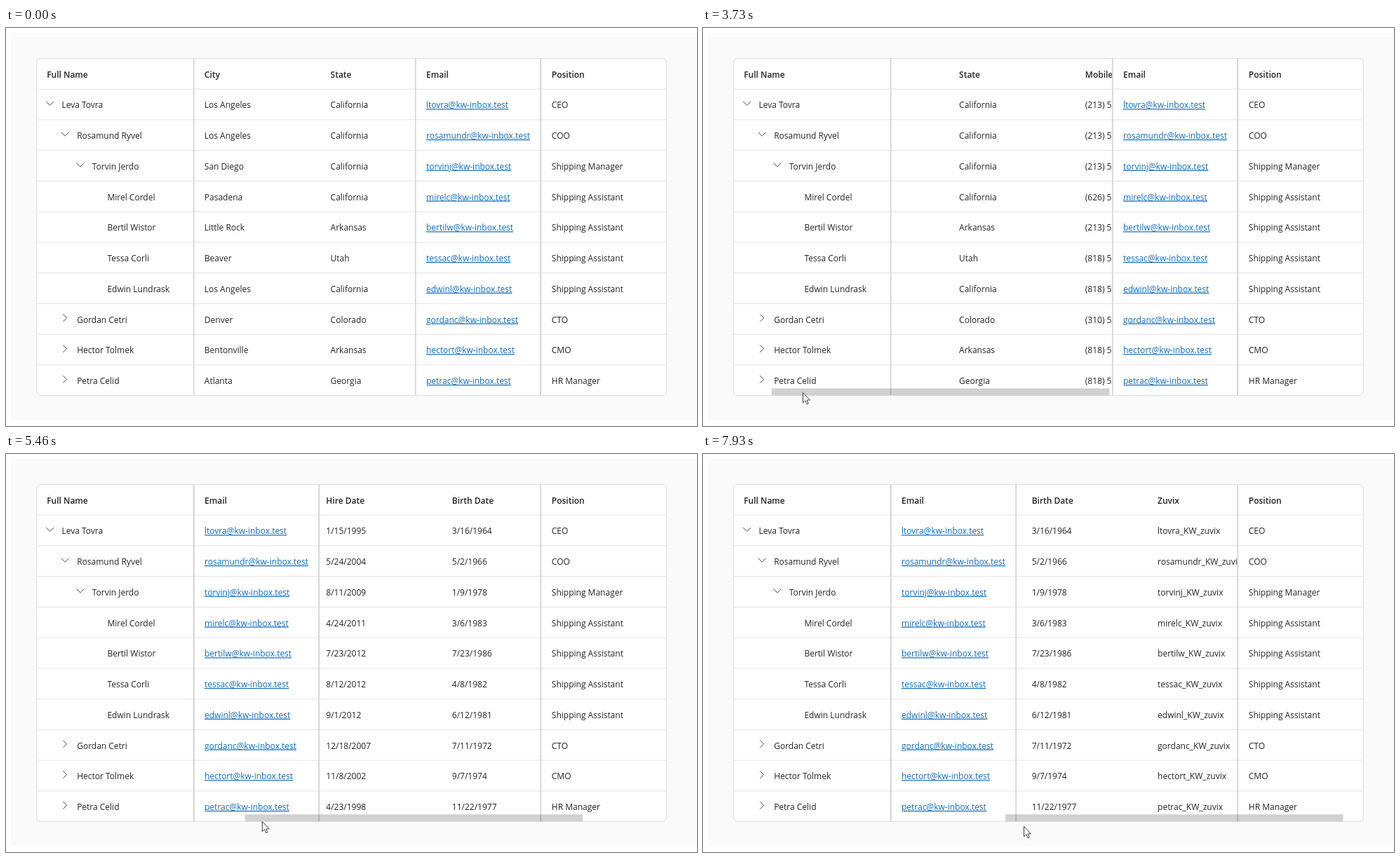
Recreate the animation shown at these times as an HTML page. Size 985 px wide and 568 px high, loop 7.99 s.

```html
<!DOCTYPE html>
<html lang="en">
<head>
<meta charset="utf-8">
<title>Employee tree list</title>
<style>
  html, body { margin: 0; width: 100%; height: 100%; overflow: hidden; background: #fff; }
  svg { display: block; width: 100%; height: 100%; }
  text { font: 12px "Open Sans", sans-serif; fill: #242424; white-space: pre; }
  .head { font-weight: 600; }
  .link { fill: #0f6cbd; text-decoration: underline; text-decoration-thickness: 1px; text-underline-offset: 1.5px; }
  .chevron { fill: none; stroke: #4a4643; stroke-width: 1; }
  .row { stroke: #e4e4e4; }
  .edge { stroke: #d6d6d6; stroke-width: 1.8; }
</style>
</head>
<body>
<svg viewBox="0 0 985 568" xmlns="http://www.w3.org/2000/svg">
  <clipPath id="view"><rect x="267.5" y="44" width="494" height="480"/></clipPath>
  <rect x="7" y="7" width="978" height="553.5" fill="#fafafa"/>
  <rect x="43.5" y="43.5" width="898" height="481" rx="5.5" fill="#fff" stroke="#e0e0e0"/>
  <g clip-path="url(#view)"><g id="cells"></g></g>
  <rect id="mask" y="44.2" width="178.3" height="479.6" fill="#fff"/>
  <g id="fixed"></g>
  <g id="email"></g>
  <rect id="thumb" y="514.3" width="481.5" height="9.9" fill="#000" fill-opacity=".18"/>
  <path id="cursor" d="M.5 .5V14.9L3.8 11.8 6.1 16.9 8.2 16 6 11H10.4Z" fill="#fff" stroke="#333" stroke-width=".95" stroke-linejoin="round"/>
</svg>
<script>
const LOOP = 7990, STEP = LOOP / 120;
const ROW = 43.75, BASE = 70.5, INDENT = 21.65;
const THUMB_MIN = 45.3, SCROLL_RATIO = 1.85;
const LEFT = 283, RIGHT = 599, EMAIL_X = 823.8;
const $ = id => document.getElementById(id);

const names = ["Leva Tovra", "Rosamund Ryvel", "Torvin Jerdo", "Mirel Cordel", "Bertil Wistor",
  "Tessa Corli", "Edwin Lundrask", "Gordan Cetri", "Hector Tolmek", "Petra Celid"];
const levels = [0, 1, 2, 3, 3, 3, 3, 1, 1, 1];
const logins = names.map((name, i) => {
  const [first, last] = name.toLowerCase().split(" ");
  return i ? first + last[0] : first[0] + last;
});

const split = s => s.split("|");
const columns = [
  [282.8, "City", split("Los Angeles|Los Angeles|San Diego|Pasadena|Little Rock|Beaver|Los Angeles|Denver|Bentonville|Atlanta")],
  [462.6, "State", split("California|California|California|California|Arkansas|Utah|California|Colorado|Arkansas|Georgia")],
  [642.3, "Mobile Phone", split("213-92|213-58|213-40|626-81|213-78|818-57|818-42|310-83|818-87|818-46")
    .map(s => `(${s.slice(0, 3)}) 555-01${s.slice(4)}`)],
  [1002.7, "Hire Date", split("1/15/1995|5/24/2004|8/11/2009|4/24/2011|7/23/2012|8/12/2012|9/1/2012|12/18/2007|11/8/2002|4/23/1998")],
  [1182.2, "Birth Date", split("3/16/1964|5/2/1966|1/9/1978|3/6/1983|7/23/1986|4/8/1982|6/12/1981|7/11/1972|9/7/1974|11/22/1977")],
  [1361.6, "Zuvix", logins.map(s => s + "_KW_zuvix")]
];
const positions = split("CEO|COO|Shipping Manager|Shipping Assistant|Shipping Assistant|Shipping Assistant|Shipping Assistant|CTO|CMO|HR Manager");

function add(parent, tag, attrs, text) {
  const el = document.createElementNS("http://www.w3.org/2000/svg", tag);
  for (const key in attrs) el.setAttribute(key, attrs[key]);
  if (text) el.textContent = text;
  return parent.appendChild(el);
}

function label(parent, x, row, text, cls = "") {
  add(parent, "text", { x, y: BASE + row * ROW, class: cls }, text);
}

function column(parent, x, title, values, cls) {
  label(parent, x, 0, title, "head");
  values.forEach((v, i) => label(parent, x, i + 1, v, cls));
}

const edge = (parent, x) => add(parent, "path", { d: `M${x} 44V524`, class: "edge" });

function build() {
  const fixed = $("fixed"), email = $("email");
  for (const [x, title, values] of columns) column($("cells"), x, title, values);

  for (let i = 1; i < 11; i++) {
    add(fixed, "path", { d: `M44 ${43.4 + i * ROW}H941`, class: "row" });
  }
  edge(fixed, 267.6);
  edge(fixed, 762.2);

  label(fixed, 58.2, 0, "Full Name", "head");
  names.forEach((name, i) => {
    const shift = levels[i] * INDENT, y = 107.6 + i * ROW;
    label(fixed, 79.5 + shift, i + 1, name);
    if (levels[i] === 3) return;
    const d = i < 3 ? "M-5.4 -2.6L0 2.8 5.4 -2.6" : "M-2.9 -5.2L2.4 0 -2.9 5.2";
    add(fixed, "path", { d, class: "chevron", transform: `translate(${62.6 + shift} ${y})` });
  });
  column(fixed, 777.8, "Position", positions);

  edge(email, -15.2);
  edge(email, 163.2);
  column(email, 0, "Email", logins.map(s => s + "@kw-inbox.test"), "link");
}

// Keys are [step, value...]; values between them are linear.
const thumbKeys = [[43, 45.3], [46, 50], [55, 91], [56, 98], [67, 201], [68, 218.3], [76, 284.3],
  [79, 313.5], [91, 422], [97, 451], [101, 458.3], [114, 458.3], [119, 431]];
const cursorKeys = [[17, 79, 562], [22, 79, 542], [28, 79, 522], [33, 80, 518], [38, 80, 518], [39, 82, 518],
  [43, 82, 518], [46, 90, 518], [56, 142, 520], [68, 252, 520], [76, 314, 521], [79, 340, 522],
  [91, 439, 530], [97, 472, 530], [103, 485, 530], [114, 485, 530], [119, 457, 531]];

function at(keys, step) {
  const next = keys.findIndex(k => k[0] > step);
  if (next === 0) return keys[0].slice(1);
  if (next < 0) return keys[keys.length - 1].slice(1);
  const a = keys[next - 1], b = keys[next];
  const p = (step - a[0]) / (b[0] - a[0]);
  return a.slice(1).map((v, i) => v + (b[i + 1] - v) * p);
}

function draw(time) {
  const step = Math.min(119, Math.floor((time % LOOP + 8) / STEP));
  const [thumb] = at(thumbKeys, step);
  const [cx, cy] = at(cursorKeys, step);
  const scroll = (thumb - THUMB_MIN) * SCROLL_RATIO;
  const emailX = Math.max(LEFT, Math.min(RIGHT, EMAIL_X - scroll));

  $("cells").setAttribute("transform", `translate(${-scroll} 0)`);
  $("email").setAttribute("transform", `translate(${emailX} 0)`);
  $("mask").setAttribute("x", emailX - 15.2);
  $("thumb").setAttribute("x", thumb);
  $("thumb").setAttribute("visibility", step < 29 ? "hidden" : "visible");
  $("cursor").setAttribute("transform", `translate(${cx} ${cy})`);
  $("cursor").setAttribute("visibility", step < 17 ? "hidden" : "visible");
}

build();
const start = performance.now();
function tick() {
  draw(performance.now() - start);
  requestAnimationFrame(tick);
}
tick();
</script>
</body>
</html>
```
